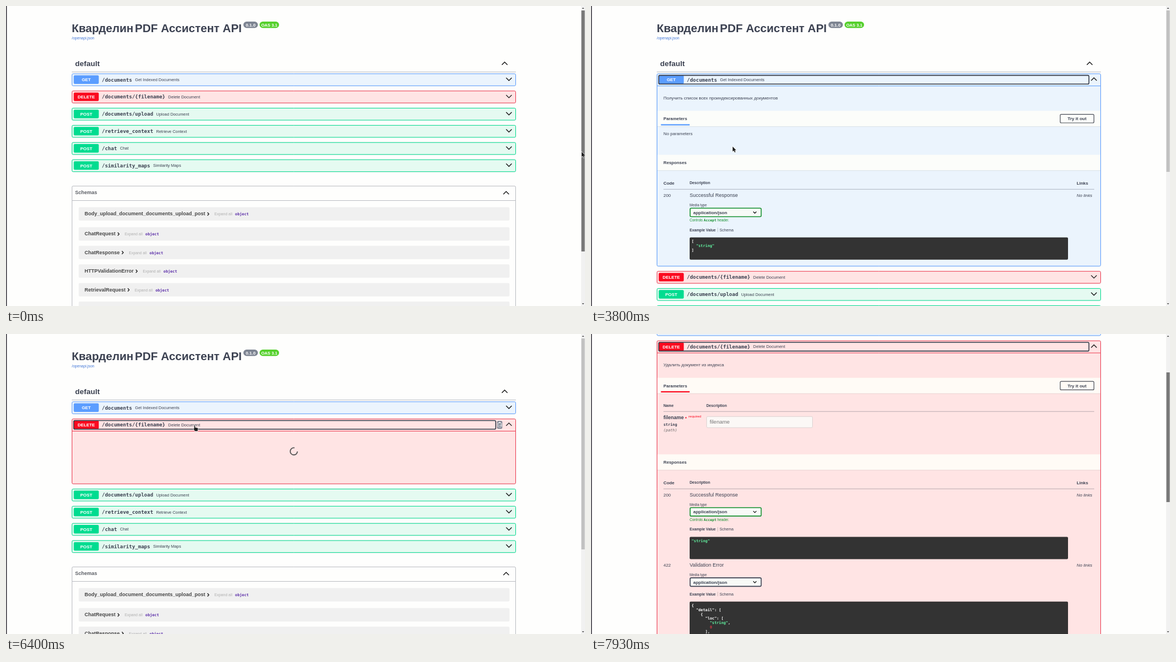
An HTML page with a canvas for the animation above (8 s loop, 1039 by 539 pixels).

```html
<!DOCTYPE html>
<html lang="ru">
<head>
<meta charset="utf-8">
<title>PDF Ассистент API</title>
<style>
html, body { margin: 0; width: 100%; height: 100%; overflow: hidden; background: #fefefd; }
canvas { display: block; }
</style>
</head>
<body>
<canvas id="stage" width="1039" height="539"></canvas>
<script>
const ctx = document.getElementById('stage').getContext('2d');
const SANS = '"Liberation Sans", Arial, sans-serif';
const MONO = '"DejaVu Sans Mono", monospace';
const INK = '#3b4151', RULE = 'rgba(59,65,81,.35)', GREEN = '#15902f', STRING = '#62f2a0';
const LOOP = 8000, STEP = 1000 / 15;
const GET_OPEN = 2670, GET_READY = 3130, GET_CLOSE = 5660, DEL_OPEN = 6130, DEL_READY = 6460;

const THEMES = {
  GET: { main: '#5b9dff', fill: '#ebf4fd' },
  DELETE: { main: '#fb0a20', fill: '#ffe4e4', edge: '#ee3a50' },
  POST: { main: '#00dc90', fill: '#e5faf1' }
};
const ROWS = [
  ['GET', '/documents', 'Get Indexed Documents'],
  ['DELETE', '/documents/{filename}', 'Delete Document'],
  ['POST', '/documents/upload', 'Upload Document'],
  ['POST', '/retrieve_context', 'Retrieve Context'],
  ['POST', '/chat', 'Chat'],
  ['POST', '/similarity_maps', 'Similarity Maps']
];
const SCHEMAS = [
  ['Body_upload_document_documents_upload_post', 373.5], ['ChatRequest', 409.5],
  ['ChatResponse', 442.7], ['HTTPValidationError', 476.2], ['RetrievalRequest', 509.7], ['RetrievalResponse', 543]
];
// time, x, y of the pointer's hot spot
const POINTER = [
  [0, 1033, 262], [1733, 1033, 262], [1800, 994.5, 238], [2130, 660, 172], [2400, 330, 131], [2600, 257.5, 127],
  [3480, 257.5, 127], [3750, 262, 225], [4050, 215, 390], [4330, 240, 424], [4670, 290, 330], [4930, 370, 180],
  [5130, 391, 127], [5670, 391, 127], [5930, 360, 150], [6130, 337.5, 164], [6680, 337.5, 164],
  [7000, 600, 150], [7300, 950, 80], [7470, 1041, 40], [LOOP, 1041, 40]
];
const SCROLL = [[0, 0], [7560, 0], [7733, 52], [7933, 140.3], [LOOP, 169]];

function track(keys, t, column = 1) {
  const i = Math.max(1, keys.findIndex(k => k[0] >= t));
  const a = keys[i - 1], b = keys[i];
  return a[column] + (b[column] - a[column]) * (t - a[0]) / (b[0] - a[0]);
}

function text(str, x, y, size = 7.9, { color = INK, style = '', font = SANS, align = 'left' } = {}) {
  ctx.font = `${style} ${size}px ${font}`;
  ctx.fillStyle = color;
  ctx.textAlign = align;
  ctx.fillText(str, x, y);
  return ctx.measureText(str).width;
}
const bold = (str, x, y, size, options) => text(str, x, y, size, { style: 'bold', ...options });
const code = (str, x, y, size, color) => bold(str, x, y, size, { font: MONO, color });

function box(x, y, w, h, { fill, stroke, width = 1, r = 2 } = {}) {
  ctx.beginPath();
  ctx.roundRect(x, y, w, h, r);
  if (fill) { ctx.fillStyle = fill; ctx.fill(); }
  if (stroke) { ctx.strokeStyle = stroke; ctx.lineWidth = width; ctx.stroke(); }
}

function line(points, color, width = 1) {
  ctx.beginPath();
  points.forEach(([x, y]) => ctx.lineTo(x, y));
  ctx.strokeStyle = color;
  ctx.lineWidth = width;
  ctx.stroke();
}
const rule = (x1, x2, y, color = RULE) => line([[x1, y], [x2, y]], color);

// dir: 1 points down, -1 points up
function chevron(x, y, dir, size = 5, width = 1.4) {
  line([[x - size, y - dir * size / 2], [x, y + dir * size / 2], [x + size, y - dir * size / 2]], '#151515', width);
}

function header() {
  bold('Кварделин', 118, 47, 20.5);
  bold('PDF Ассистент API', 423, 47, 20.5, { align: 'right' });
  box(426, 28, 26, 11.5, { fill: '#7d8492', r: 5.75 });
  bold('0.1.0', 439, 36.6, 7.9, { color: '#fff', align: 'center' });
  box(455, 28, 35, 11.5, { fill: '#55d02c', r: 5.75 });
  bold('OAS 3.1', 472.5, 36.6, 7.6, { color: '#fff', align: 'center' });
  text('/openapi.json', 118, 59.5, 6.83, { color: '#4579d8' });
  bold('default', 124, 108, 13.5);
  chevron(894.8, 103.3, -1);
  rule(118, 915, 118.5);
}

function spinner(y, age) {
  const start = (age - 265) / 1000 * 2 * Math.PI;
  ctx.beginPath();
  ctx.arc(516.5, y, 6.4, start, start + Math.PI * 1.55);
  ctx.strokeStyle = '#555';
  ctx.lineWidth = 1.8;
  ctx.stroke();
}

function copyIcon(y, w) {
  const x = 890.5 - w;
  box(x, y - 7, w, 14, { fill: '#7d8492' });
  const m = x + w / 2;
  box(m - 3, y - 3.5, 6, 7.5, { stroke: '#fff', width: .9, r: .5 });
  box(m - 1.5, y - 4.8, 3, 2, { fill: '#fff', r: .5 });
  rule(m - 1.5, m + 3.8, y + .8, '#fff');
}

function sectionBand(y, label) {
  ctx.fillStyle = 'rgba(255,255,250,.84)';
  ctx.fillRect(119, y, 795, 28);
  rule(119, 914, y + 28.4, 'rgba(0,0,0,.09)');
  bold(label, 130, y + 17, 7.8);
}

function codeBlock(y, h, lines) {
  box(177, y, 679, h, { fill: '#333' });
  lines.forEach(([indent, str, color = '#fff'], i) => {
    const x = 180.5 + indent * 4.09, base = y + 9.4 + i * 7.8;
    const comma = color === STRING && str.endsWith(',');
    code(comma ? str.slice(0, -1) : str, x, base, 6.8, color);
    if (comma) code(',', x + (str.length - 1) * 4.09, base, 6.8, '#fff');
  });
}

// y is the middle of the status line
function response(y, status, label, accept, height, lines) {
  text(status, 130, y + 3);
  text(label, 177, y + 3.2, 9);
  text('No links', 871.5, y + 3, 7.9, { style: 'italic' });
  text('Media type', 177, y + 20, 6.3);
  box(177.8, y + 23.2, 127.6, 15.2, { fill: '#f8faf7', stroke: accept ? GREEN : INK, width: 1.6 });
  bold('application/json', 183.5, y + 33.6, 8);
  chevron(294, y + 30.8, 1, 2.8, 1.3);
  if (accept) {
    const color = GREEN;
    let x = 177 + text('Controls ', 177, y + 47, 6.3, { color });
    x += code('Accept', x, y + 47, 6.3, color);
    text(' header.', x, y + 47, 6.3, { color });
  }
  const tabs = y + (accept ? 64.7 : 54.7);
  bold('Example Value', 177, tabs, 6.7);
  line([[227.5, tabs - 6.5], [227.5, tabs + 1.5]], 'rgba(0,0,0,.25)', .7);
  text('Schema', 230.7, tabs, 6.83);
  codeBlock(tabs + 11, height, lines);
}

function responses(y) {
  sectionBand(y, 'Responses');
  bold('Code', 130, y + 53.5, 7.9);
  bold('Description', 177, y + 53, 6.7);
  bold('Links', 871.5, y + 53.5, 7.9);
  rule(130, 903, y + 62);
}

function details(c, description, color) {
  text(description, 130, c + 35.4);
  sectionBand(c + 56, 'Parameters');
  ctx.fillStyle = color;
  ctx.fillRect(125.5, c + 80, 51.5, 2.3);
  box(842, c + 62.3, 60.5, 15.4, { stroke: '#4a4e58', width: 1.2 });
  bold('Try it out', 872.2, c + 72.8, 8, { align: 'center' });
}

function getDetails(c) {
  details(c, 'Получить список всех проиндексированных документов', THEMES.GET.main);
  text('No parameters', 130, c + 100);
  responses(c + 135);
  response(c + 207.8, '200', 'Successful Response', true, 40, [[0, '['], [2, '"string"', STRING], [0, ']']]);
}

function deleteDetails(c) {
  const red = THEMES.DELETE.main;
  details(c, 'Удалить документ из индекса', red);
  bold('Name', 130, c + 108, 6.7);
  bold('Description', 207, c + 108, 6.7);
  rule(130, 903, c + 116.5);
  bold('filename', 130, c + 130.6, 9);
  bold('*', 168.7, c + 131, 8, { color: red });
  text('required', 175, c + 127.5, 6.2, { color: red });
  code('string', 130, c + 142, 6.8, INK);
  text('(path)', 130, c + 152.5, 6.8, { font: MONO, style: 'italic', color: '#666' });
  box(207.5, c + 125.5, 190, 20, { fill: '#fbf8f6', stroke: '#ddd3d1' });
  text('filename', 213, c + 138.4, 9.5, { color: '#757575' });
  responses(c + 193.5);
  response(c + 266, '200', 'Successful Response', true, 40, [[0, '"string"', STRING]]);
  response(c + 392.2, '422', 'Validation Error', false, 120, [
    [0, '{'], [2, '"detail": ['], [4, '{'], [6, '"loc": ['], [8, '"string",', STRING], [8, '0', '#d03b45'],
    [6, '],'], [6, '"msg": "string",'], [6, '"type": "string"'], [4, '}'], [2, ']'], [0, '}']
  ]);
}

function row([method, path, summary], c, open) {
  const { main, fill, edge = main } = THEMES[method];
  ctx.shadowColor = 'rgba(0,0,0,.19)';
  ctx.shadowBlur = 2;
  box(118.5, c - 10.5, 796, open ? open.height : 21.5, { fill });
  ctx.shadowBlur = 0;
  box(118.5, c - 10.5, 796, open ? open.height : 21.5, { stroke: edge });
  box(121.5, c - 7.7, 45, 15.4, { fill: main });
  bold(method, 144, c + 2.9, 7.9, { color: '#fff', align: 'center' });
  const width = code(path, 172, c + 3.2, 9, INK);
  text(summary, 172 + width + 5.3, c + 2.6, 7.4);
  chevron(902.5, c - .8, open ? -1 : 1);
  if (!open) return;
  rule(118.5, 914.5, c + 11.3, edge);
  const right = open.icon ? 888 - open.icon : 893.5;
  box(121.5, c - 7.7, right - 121.5, 15.6, { stroke: '#333947', width: 1.6 });
  if (open.icon) copyIcon(c, open.icon);
  if (open.ready) open.draw(c);
  else spinner(c + 47.7, open.age);
}

function schemas(shift) {
  ctx.save();
  ctx.translate(0, shift);
  box(118.5, 323.5, 796, 300, { stroke: RULE });
  bold('Schemas', 124, 338.2, 9, { color: '#5c5f66' });
  chevron(897.5, 335.8, -1);
  rule(119, 914, 349.5);
  for (const [name, y] of SCHEMAS) {
    box(130.5, y - 12, 773, 24, { fill: '#f0f0f0' });
    const end = 141 + bold(name, 141, y + 2.9, 9, { color: '#474747' });
    line([[end + 4, y - 2.4], [end + 6.5, y + .3], [end + 4, y + 3]], '#222', 1.4);
    text('Expand all', end + 16.5, y + 2.8, 6.83, { color: '#b0b0b0' });
    code('object', end + 53.6, y + 2.8, 6.75, '#5a2ca8');
  }
  ctx.restore();
}

function scrollbar(top, length, color) {
  ctx.fillStyle = '#f1f1f1';
  ctx.fillRect(1032, 0, 7, 539);
  ctx.fillStyle = color;
  ctx.fillRect(1032.5, top, 6, length);
  ctx.fillStyle = '#505050';
  for (const [y, dir] of [[4, -1], [535, 1]]) {
    ctx.beginPath();
    ctx.moveTo(1033.5, y - dir);
    ctx.lineTo(1037.5, y - dir);
    ctx.lineTo(1035.5, y + dir * 1.3);
    ctx.fill();
  }
}

const ARROW = new Path2D('M0 0V9L2.1 7.2L3.7 10.6L5.2 9.9L3.7 6.7H6.4Z');
const HAND = new Path2D('M.2 .6Q1 -.3 1.8 .6V4L6 4.7Q7.2 5 7 6.5L6.2 10.4H1.8L-1 7Q-1.6 5.8 -.4 5.8L.2 6.2Z');
function pointer(x, y, hand) {
  ctx.save();
  ctx.translate(x, y);
  ctx.lineWidth = 1.2;
  ctx.strokeStyle = '#fff';
  ctx.fillStyle = '#1c1c1c';
  ctx.stroke(hand ? HAND : ARROW);
  ctx.fill(hand ? HAND : ARROW);
  ctx.restore();
}

function draw(t) {
  const x = track(POINTER, t), y = track(POINTER, t, 2), scroll = track(SCROLL, t);
  const getOpen = t >= GET_OPEN && t < GET_CLOSE, delOpen = t >= DEL_OPEN;
  const over = c => x > 118 && x < 890 && Math.abs(y + 2 - c) < 11;
  const grow = since => Math.max(0, Math.min(1, (t - since) / 190)) * 13.5;
  const open = [];
  let shift = 0, thumb = 433;
  if (getOpen) {
    const ready = t >= GET_READY;
    shift = ready ? 324 : 95;
    thumb = ready ? 290 : 379;
    open[0] = { ready, height: shift + 21.5, age: t - GET_OPEN, icon: over(132.3) && grow(GET_OPEN), draw: getDetails };
  } else if (delOpen) {
    const ready = t >= DEL_READY;
    shift = ready ? 640 : 95;
    thumb = ready ? 233 : 379;
    open[1] = { ready, height: shift + 21.5, age: t - DEL_OPEN, icon: over(163.2) && grow(6270), draw: deleteDetails };
  }

  ctx.fillStyle = '#fefefd';
  ctx.fillRect(0, 0, 1039, 539);
  ctx.save();
  ctx.translate(0, -scroll);
  header();
  const openRow = open.findIndex(Boolean);
  ROWS.forEach((item, i) => {
    row(item, 132.3 + i * 30.87 + (openRow >= 0 && i > openRow ? shift : 0), open[i]);
  });
  schemas(shift);
  ctx.restore();

  ctx.fillStyle = '#34323c';
  ctx.fillRect(0, 0, 1.5, 539);
  const pressed = t < 1860 || t >= 7460;
  scrollbar(8 + scroll * .434, thumb, pressed ? '#787878' : '#c1c1c1');
  pointer(x, y, over(132.3) || !getOpen && over(163.2));
}

function tick(now) {
  draw(Math.floor((now % LOOP + 4) / STEP) * STEP);
  requestAnimationFrame(tick);
}
requestAnimationFrame(tick);
</script>
</body>
</html>
```
